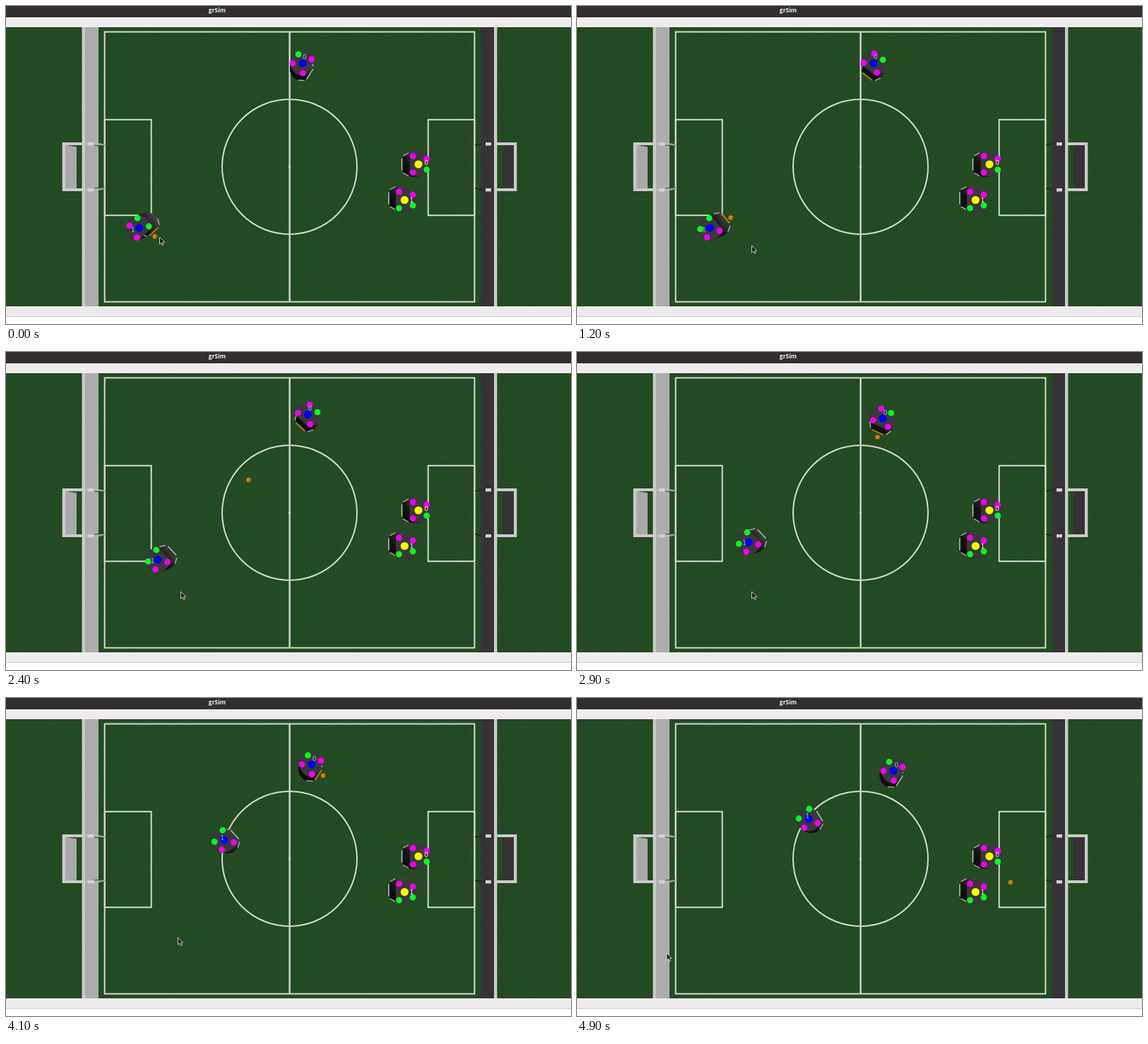
These frames come from a looping animation (800x450 px, 5 s). An HTML page with a canvas:

```html
<!DOCTYPE html>
<html lang="en">
<head>
<meta charset="utf-8">
<title>grSim</title>
<style>
html, body { margin: 0; width: 100%; height: 100%; overflow: hidden; background: #fff; }
canvas { display: block; width: 800px; height: 450px; }
</style>
</head>
<body>
<canvas id="stage" width="800" height="450"></canvas>
<script>
const ctx = document.getElementById('stage').getContext('2d');
const LOOP = 5000, STEP = 100;
const CX = 401.5, CY = 227.5, TALL = 0.055;
const KICK = 2000, CATCH = 2650, SHOT = 4250, BOUNCE = 4750, END = 4900;
const RAD = Math.PI / 180;
const LINE = '#d3dad3', POST = '#cbcbcb';
const PINK = '#f000ee', GREEN = '#0bf524', BLUE = '#0000f2', YELLOW = '#fdf905';

const ramp = (t, from, to) => Math.max(0, Math.min(1, (t - from) / (to - from)));
const easeOut = u => 1 - (1 - u) ** 2;
const mix = (a, b, u) => a.map((v, i) => v + (b[i] - v) * u);

function rect(c, color, x, y, w, h) {
  c.fillStyle = color;
  c.fillRect(x, y, w, h);
}

function disc(c, color, x, y, r) {
  c.fillStyle = color;
  c.beginPath();
  c.arc(x, y, r, 0, 7);
  c.fill();
}

function wedge(c, color, x1, y1, h1, x2, y2, h2) {
  c.fillStyle = color;
  c.beginPath();
  c.moveTo(x1, y1);
  c.lineTo(x2, y2);
  c.lineTo(x2, y2 + h2);
  c.lineTo(x1, y1 + h1);
  c.fill();
}

// Faint seeded turf grain
function turf(c) {
  rect(c, '#234a23', 0, 30, 800, 395);
  let seed = 7;
  const rnd = () => (seed = seed * 16807 % 2147483647) / 2147483647;
  for (let i = 0; i < 5000; i++) {
    const shade = rnd() < 0.5 ? 'rgba(0,0,0,.03)' : 'rgba(90,140,80,.04)';
    rect(c, shade, rnd() * 800 | 0, 30 + rnd() * 393 | 0, 3, 2);
  }
}

function markings(c) {
  c.strokeStyle = LINE;
  c.lineWidth = 2;
  c.strokeRect(139.7, 36.6, 523.7, 382);
  c.strokeRect(139.7, 160.8, 66, 135.4);
  c.strokeRect(597.7, 160.8, 65.7, 135.4);
  rect(c, LINE, 400.4, 37, 2.4, 381);
  c.beginPath();
  c.arc(CX, CY, 95.5, 0, 7);
  c.stroke();
  disc(c, LINE, CX, CY, 1.6);
}

function goals(c) {
  rect(c, '#a9a9a9', 84, 197, 16, 61);
  wedge(c, '#3a423a', 88, 197, 0.5, 101, 197, 2.5);
  rect(c, '#343234', 703, 197, 16, 61);
  rect(c, POST, 79.7, 193, 4.3, 69);
  rect(c, POST, 719, 193, 4.3, 69);
  for (const y of [193, 258]) {
    const lean = y < CY ? 1 : -1, mid = y + 2;
    rect(c, POST, 80, y, 32, 4);
    rect(c, POST, 691, y, 32, 4);
    rect(c, '#b8b8b8', 112, y, 19, 4);
    for (const x of [116, 679]) rect(c, '#d2d2d2', x, y, 8, 4.5);
    wedge(c, '#9a9f9a', 130, mid - 1.5, 3, 140, mid + lean * 2 - 1, 2);
    wedge(c, '#3c433c', 125, mid + lean * 2 - 0.5, 1, 139, mid + lean * 3.5 - 0.5, 1);
    wedge(c, '#1d2b1d', 673, mid - 1, 2, 664, mid + lean * 2 - 1, 1.5);
  }
}

function makeScene() {
  const layer = document.createElement('canvas');
  layer.width = 800;
  layer.height = 450;
  const c = layer.getContext('2d');
  rect(c, '#fff', 0, 0, 800, 450);
  turf(c);
  rect(c, POST, 107.5, 30, 4.5, 395);
  rect(c, '#acacac', 112, 30, 19, 395);
  rect(c, '#353335', 672.5, 30, 18.5, 395);
  rect(c, POST, 691, 30, 4.4, 395);
  markings(c);
  goals(c);

  rect(c, '#322e30', 0, 0, 800, 16);
  rect(c, '#f0ebed', 0, 16, 800, 14);
  rect(c, '#eeebed', 0, 425, 800, 14);
  rect(c, '#cfcccd', 0, 439, 800, 1);
  c.fillStyle = '#f4f2f2';
  c.font = 'bold 8.5px "Open Sans", "Noto Sans", sans-serif';
  c.textAlign = 'center';
  c.fillText('grSim', 299, 9);
  return layer;
}

// Disc with a flat front
function shell(x, y, r, a) {
  ctx.beginPath();
  ctx.arc(x, y, r, a + 45 * RAD, a - 45 * RAD);
  ctx.fill();
}

// Short bar facing outwards at distance r
function bar(x, y, a, r, half, color, width) {
  const c = Math.cos(a), s = Math.sin(a);
  ctx.strokeStyle = color;
  ctx.lineWidth = width;
  ctx.beginPath();
  ctx.moveTo(x + r * c + half * s, y + r * s - half * c);
  ctx.lineTo(x + r * c - half * s, y + r * s + half * c);
  ctx.stroke();
}

// The camera is above the centre, so a robot's foot lies nearer to it
const foot = (x, y) => mix([x, y], [CX, CY], TALL);

// back: colours of the back right and back left dots; left: front left dot
function robot([x, y, deg], id, team, left, back, spinning) {
  const a = deg * RAD;
  const [bx, by] = foot(x, y);
  const side = ctx.createLinearGradient(bx - 11, by + 9, bx + 13, by - 10);
  side.addColorStop(0, '#0b0a0b');
  side.addColorStop(0.4, '#161516');
  side.addColorStop(1, '#484648');
  ctx.fillStyle = side;
  for (let k = 0; k <= 1; k += 0.1) {
    const [sx, sy] = mix([bx, by], [x, y], k);
    shell(sx, sy, 17 + k * 0.4, a);
  }
  for (const s of [-1, 1]) bar(bx, by, a + s * 61 * RAD, 16.2, 4.5, '#a5a7a5', 1.5);
  bar(bx, by, a, 13.5, 8.5, spinning ? '#a17c10' : '#bcbfbc', spinning ? 2 : 1.4);
  ctx.fillStyle = '#3a373c';
  shell(x, y, 17.4, a);

  const dot = (color, d) =>
    disc(ctx, color, x + 14 * Math.cos(a + d * RAD), y + 14 * Math.sin(a + d * RAD), 4.4);
  dot(left, -56);
  dot(PINK, 56);
  dot(back[0], 147);
  dot(back[1], -147);
  disc(ctx, team, x, y, 5.6);

  const lx = x + (x - CX) * 0.05 + 2, ly = y + (y - CY) * 0.05 + 1.5;
  ctx.font = '9px "DejaVu Sans", sans-serif';
  ctx.textAlign = 'center';
  ctx.fillStyle = team === BLUE ? '#6fcdd6' : '#fbf6a0';
  ctx.fillText(id, lx, ly);
}

function ball([x, y]) {
  disc(ctx, '#7d5208', x, y, 3.7);
  disc(ctx, '#cd8a10', x - 0.3, y - 0.3, 2.9);
  disc(ctx, '#94600a', x + 0.8, y + 0.4, 1);
}

function cursor([x, y]) {
  ctx.save();
  ctx.translate(x, y);
  const arrow = new Path2D('M0 0V10L2.3 8L4 11.5L5.6 10.7L4.1 7.4L7 7.1Z');
  ctx.fillStyle = '#141414';
  ctx.fill(arrow);
  ctx.strokeStyle = '#dcdcdc';
  ctx.lineWidth = 0.9;
  ctx.stroke(arrow);
  ctx.restore();
}

// Receiver: turns to the pass, meets it, turns to the goal, follows the shot
function receiver(t) {
  const meet = 13 * ramp(t, KICK, 2700), follow = ramp(t, SHOT, END);
  const turn = easeOut(ramp(t, 0, 1600)) - easeOut(ramp(t, 2750, 4300));
  return [420 + meet + 15 * follow, 81 + meet + 9 * follow, 32 + 101 * turn];
}

// Passer: turns, kicks, then drives upfield through a few points
function passer(t) {
  const path = [[1950, 188.5, 314], [2400, 215, 294], [3400, 271, 244], [4100, 309, 201], [END, 328, 171]];
  const next = path.findIndex((p, i) => i && (t <= p[0] || p[0] === END));
  const a = path[next - 1], b = path[next];
  const [, x, y] = mix(a, b, ramp(t, a[0], b[0]));
  return [x, y, 47 - 90 * easeOut(ramp(t, 0, 1500)) + 12 * ramp(t, 4100, END)];
}

function held([x, y, deg], bias) {
  const [bx, by] = foot(x, y), a = (deg + bias) * RAD;
  return [bx + 20 * Math.cos(a), by + 20 * Math.sin(a)];
}

function ballAt(t) {
  const wall = [669, 245];
  if (t < KICK) return held(passer(t), 11);
  if (t < CATCH) return mix([217, 298], [423, 108], ramp(t, KICK, CATCH));
  if (t < SHOT) return held(receiver(t), -8.5);
  if (t < BOUNCE) return mix([450, 110], wall, ramp(t, SHOT, BOUNCE));
  return mix(wall, [614, 261], ramp(t, BOUNCE, END));
}

function cursorAt(t) {
  const leave = ramp(t, 4600, END) ** 2;
  return [
    217.5 + 30 * easeOut(ramp(t, 0, 1100)) - 4 * ramp(t, 3700, 4100) - 116.5 * leave,
    327 + 12 * ramp(t, 0, 400) + 22 * leave
  ];
}

const scene = makeScene();

function draw(t) {
  ctx.drawImage(scene, 0, 0);
  ball(ballAt(t));
  robot(receiver(t), '0', BLUE, PINK, [PINK, GREEN], t >= 100 && t < SHOT);
  robot(passer(t), '1', BLUE, GREEN, [PINK, GREEN], t < KICK);
  robot([584, 224, 180], '0', YELLOW, PINK, [PINK, GREEN], false);
  robot([564.3, 274.5, 180], '1', YELLOW, GREEN, [PINK, GREEN], false);
  cursor(cursorAt(t));
}

const start = performance.now();
function tick() {
  const t = (performance.now() - start) % LOOP;
  draw(Math.floor(t / STEP) * STEP);
  requestAnimationFrame(tick);
}
tick();
</script>
</body>
</html>
```
